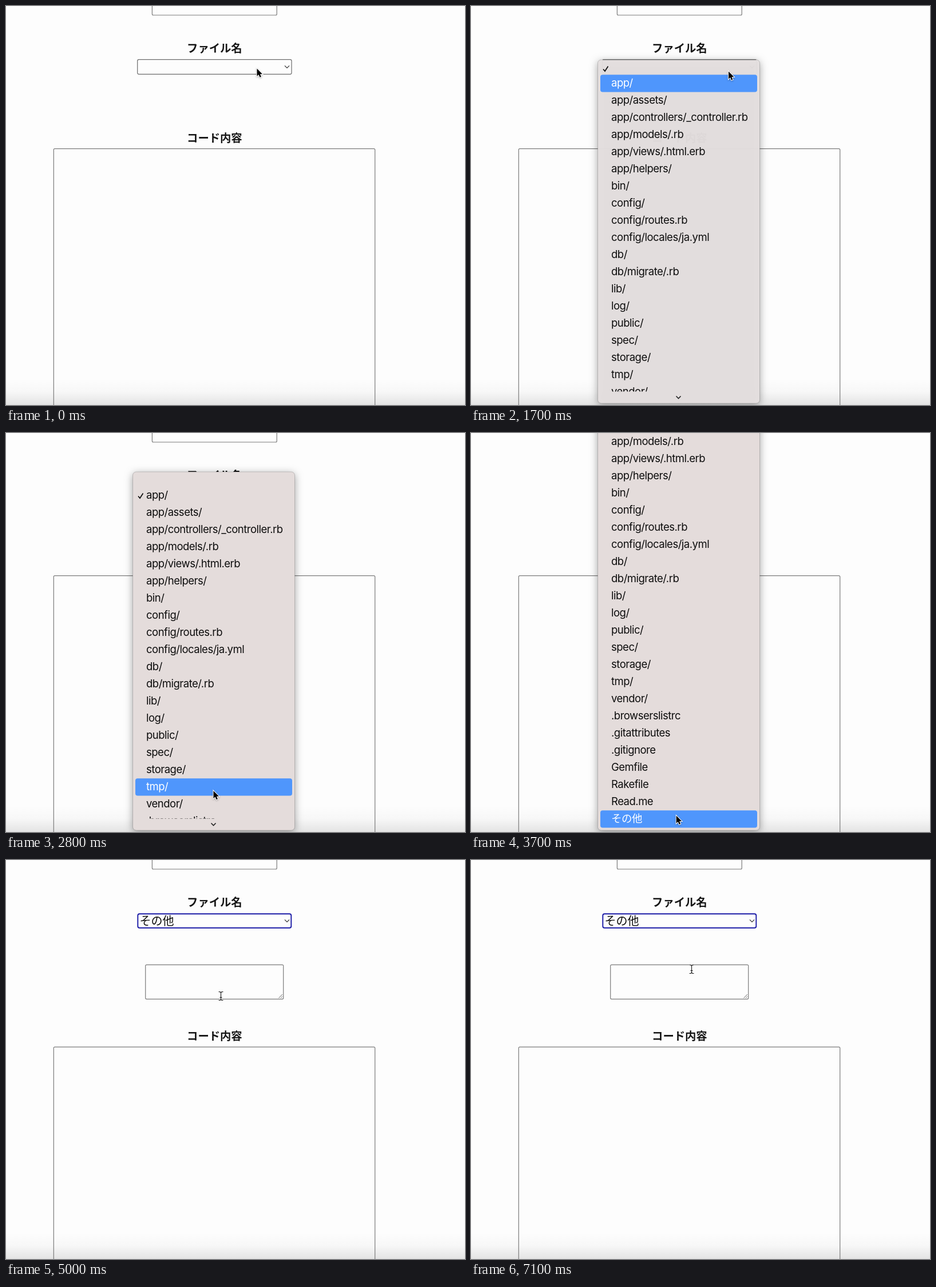
These frames come from a looping animation (802x698 px, 7.2 s). An HTML page with a canvas:

```html
<!DOCTYPE html>
<html lang="ja">
<head>
<meta charset="utf-8">
<title>ファイル名</title>
<style>
  html, body { margin: 0; width: 100%; height: 100%; overflow: hidden; background: #fdfdfd; }
  canvas { display: block; }
</style>
</head>
<body>
<canvas id="stage" width="802" height="698"></canvas>
<script>
const ctx = document.getElementById('stage').getContext('2d');
const LOOP = 7200, STEP = 100, ROW = 30;
const GRAY = '#7b7b7b', BLUE = '#1a1aa6', INK = '#0d0d0d';
const MENU_FONT = '18.5px Inter, "Noto Sans CJK JP", sans-serif';
const FIELD_FONT = '20px "Liberation Sans", "Noto Sans CJK JP", sans-serif';
const HEAD_FONT = 'bold 19.3px "Noto Sans CJK JP", sans-serif';

const ITEMS = ['', 'app/', 'app/assets/', 'app/controllers/_controller.rb', 'app/models/.rb',
  'app/views/.html.erb', 'app/helpers/', 'bin/', 'config/', 'config/routes.rb',
  'config/locales/ja.yml', 'db/', 'db/migrate/.rb', 'lib/', 'log/', 'public/', 'spec/',
  'storage/', 'tmp/', 'vendor/', '.browserslistrc', '.gitattributes', '.gitignore',
  'Gemfile', 'Rakefile', 'Read.me', 'その他'];

// time, x, y
const POINTER = [
  [0, 438.5, 109.5], [300, 440, 110], [800, 418, 330], [1000, 418, 330], [1700, 450, 114.5],
  [2100, 453, 105.5], [2400, 453, 105.5], [2800, 362.5, 626], [3300, 362.5, 626],
  [3600, 358.7, 669.5], [4600, 358.7, 669.5], [5000, 375, 238], [5400, 385, 191], [LOOP, 385, 191]];

const MENUS = [
  { open: 300, pick: 1900, checked: 0, base: () => 90, fill: 'rgba(229,224,224,.96)' },
  { open: 2500, pick: 4200, checked: 1, base: t => 64 - 184 * ease((t - 2800) / 400), fill: '#e4dcdb' }];
const FADE = 200;

const clamp = v => Math.max(0, Math.min(1, v));
function ease(v) { v = clamp(v); return v * v * (3 - 2 * v); }

function pointerAt(t) {
  const i = POINTER.findIndex(p => p[0] > t);
  const [t0, x0, y0] = POINTER[i - 1], [t1, x1, y1] = POINTER[i];
  const k = ease((t - t0) / (t1 - t0));
  return { x: x0 + (x1 - x0) * k, y: y0 + (y1 - y0) * k };
}

function text(str, x, y, font, { color = INK, align = 'left', spacing = 0 } = {}) {
  ctx.font = font;
  ctx.letterSpacing = spacing + 'px';
  ctx.fillStyle = color;
  ctx.textAlign = align;
  ctx.fillText(str, x, y);
}

function roundRect(x, y, w, h, r) {
  ctx.beginPath();
  ctx.roundRect(x, y, w, h, r);
}

function box(x, y, w, h, r = 2, color = GRAY, width = 1.2) {
  roundRect(x, y, w, h, r);
  ctx.strokeStyle = color;
  ctx.lineWidth = width;
  ctx.stroke();
}

function line(points, color, width) {
  ctx.beginPath();
  points.forEach(([x, y]) => ctx.lineTo(x, y));
  ctx.strokeStyle = color;
  ctx.lineWidth = width;
  ctx.stroke();
}

const chevron = (x, y, color, width) =>
  line([[x - 4, y - 2], [x, y + 2], [x + 4, y - 2]], color, width);

const heading = (str, y) => text(str, 364.3, y, HEAD_FONT, { color: '#151515', align: 'center' });

function drawPage(t) {
  const other = t >= MENUS[1].pick + STEP, focused = t >= MENUS[0].pick;
  const shift = other ? 77.5 : 0;
  ctx.fillStyle = '#fdfdfd';
  ctx.fillRect(0, 0, 802, 698);
  const shade = ctx.createLinearGradient(0, 652, 0, 698);
  shade.addColorStop(0, 'rgba(0,0,0,0)');
  shade.addColorStop(.5, 'rgba(0,0,0,.025)');
  shade.addColorStop(1, 'rgba(0,0,0,.1)');
  ctx.fillStyle = shade;
  ctx.fillRect(0, 652, 802, 46);

  box(255.4, -20, 217.8, 36);
  heading('ファイル名', 81);
  if (focused) box(230.3, 94.2, 268, 24.6, 3, BLUE, 1.9);
  else box(229.7, 93.7, 269.3, 25.6, 2.5, '#6c6c6c');
  chevron(491, 106.3, '#333', 1.2);
  if (focused) text(other ? 'その他' : 'app/', 233.5, 113.5, FIELD_FONT);

  if (other) {
    box(243.7, 183.3, 241, 60);
    line([[476.5, 241.5], [483, 235]], '#666', 1);
    line([[480, 241.5], [483, 238.5]], '#666', 1);
  }
  heading('コード内容', 237.5 + shift);
  box(83.3, 249.7 + shift, 561.4, 600);
}

function drawMenu(menu, t, pointer) {
  const base = menu.base(t), top = base + 4;
  const more = base > -120;
  const hovered = Math.floor((pointer.y + 6.5 - base) / ROW);
  ctx.save();
  ctx.globalAlpha = 1 - clamp((t - menu.pick) / FADE);

  ctx.save();
  ctx.shadowColor = 'rgba(0,0,0,.38)';
  ctx.shadowBlur = 14;
  ctx.shadowOffsetY = 3;
  ctx.fillStyle = menu.fill;
  roundRect(221.5, top, 283, 691 - base, 6);
  ctx.fill();
  ctx.restore();
  box(221.5, top, 283, 691 - base, 6, 'rgba(0,0,0,.17)', 1);
  if (!menu.checked) line([[230, 94], [498, 94]], '#777', 1);

  ctx.save();
  ctx.beginPath();
  ctx.rect(221, top, 284, (more ? 674.5 : 695) - top);
  ctx.clip();
  ITEMS.forEach((label, i) => {
    const y = base + i * ROW, color = i === hovered ? '#fff' : INK;
    if (i === hovered) {
      const inset = i ? 0 : 5;
      ctx.fillStyle = '#4f96fc';
      roundRect(226, y + inset + .2, 274, ROW - inset + .3, 4);
      ctx.fill();
    }
    text(label, 245, y + 21.4, MENU_FONT, { color, spacing: -.5 });
    if (i === menu.checked) {
      const cy = y + (i ? 16 : 20);
      line([[231, cy + .5], [234, cy + 4], [239.5, cy - 4.5]], color, 1.7);
    }
  });
  ctx.restore();
  if (more) chevron(362.5, 684.5, '#222', 1.6);
  ctx.restore();
}

function drawArrow({ x, y }) {
  ctx.save();
  ctx.translate(x, y);
  ctx.beginPath();
  [[0, 0], [0, 13.2], [3, 10.5], [5.1, 15.2], [7.4, 14.2], [5.4, 9.7], [9.4, 9.5]]
    .forEach(([px, py]) => ctx.lineTo(px, py));
  ctx.closePath();
  ctx.shadowColor = 'rgba(0,0,0,.3)';
  ctx.shadowBlur = 3;
  ctx.shadowOffsetY = 1;
  ctx.strokeStyle = '#fff';
  ctx.lineWidth = 2;
  ctx.stroke();
  ctx.shadowColor = 'transparent';
  ctx.fillStyle = '#000';
  ctx.fill();
  ctx.restore();
}

function drawBeam({ x, y }) {
  ctx.save();
  ctx.translate(x + .5, y);
  for (const [color, width] of [['rgba(255,255,255,.9)', 3], ['#222', 1.2]]) {
    line([[0, -6], [0, 6]], color, width);
    for (const s of [-1, 1]) line([[-4, 7.5 * s], [-1.5, 7.3 * s], [0, 6 * s], [1.5, 7.3 * s], [4, 7.5 * s]], color, width);
    line([[-2, 2.5], [2, 2.5]], color, width);
  }
  ctx.restore();
}

function draw(now) {
  const t = Math.floor(now % LOOP / STEP) * STEP;
  const pointer = pointerAt(t);
  drawPage(t);
  const menu = MENUS.find(m => t >= m.open && t < m.pick + FADE);
  if (menu) drawMenu(menu, t, pointer);
  (t >= MENUS[1].pick + FADE ? drawBeam : drawArrow)(pointer);
  requestAnimationFrame(draw);
}
requestAnimationFrame(draw);
</script>
</body>
</html>
```
